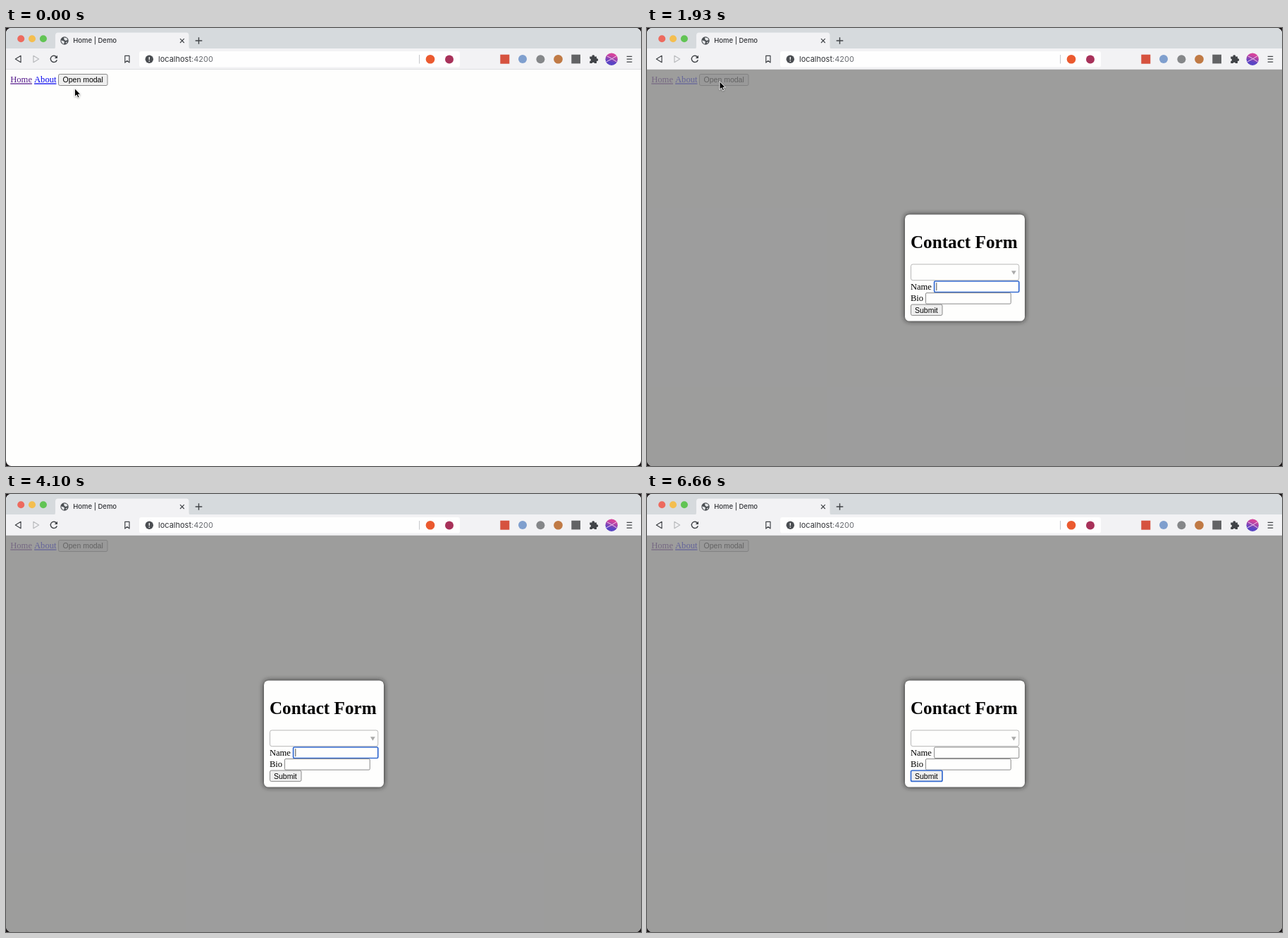
An HTML page that plays this animation: 901x621 px, repeating every 7130 ms.

```html
<!DOCTYPE html>
<html lang="en">
<head>
<meta charset="utf-8">
<title>Modal focus demo</title>
<style>
  html, body { margin: 0; width: 100%; height: 100%; overflow: hidden; background: #1b1618; }
  svg { display: block; }
  .ui { font-family: Inter, "Open Sans", sans-serif; }
  .serif { font: 12.6px "Liberation Serif", Times, serif; }
  .btn-text { font: 10.5px "Liberation Sans", Arial, sans-serif; }
  .link { text-decoration: underline; }
  .icon { fill: none; stroke: #414448; stroke-width: 1.2; }
  .field { fill: #fefefd; stroke: #777; stroke-width: .85; }
  .select { stroke: #aaa; }
  .button { fill: #efefef; stroke: #777; stroke-width: .85; }
  .button.hover { fill: #e5e5e5; }
  .button.active { fill: #f5f5f5; }
  .focus { stroke: #356bd0; stroke-width: 1.7; }
  .caret { stroke: #222; stroke-width: .8; visibility: hidden; }
  .focus + .caret { visibility: visible; }
</style>
</head>
<body>
<svg width="901" height="621" viewBox="0 0 901 621">
  <defs>
    <clipPath id="window"><rect width="901" height="621" rx="7.5"/></clipPath>
    <linearGradient id="avatar" x1=".7" y1="0" x2=".4" y2="1">
      <stop offset=".2" stop-color="#d5449c"/><stop offset=".75" stop-color="#5a45c4"/>
    </linearGradient>
    <filter id="blur" x="-20%" y="-20%" width="140%" height="140%"><feGaussianBlur stdDeviation="3.9"/></filter>
    <filter id="soft" x="-50%" y="-50%" width="200%" height="200%">
      <feDropShadow dx="0" dy=".8" stdDeviation=".8" flood-opacity=".35"/>
    </filter>
  </defs>

  <g clip-path="url(#window)">
    <rect width="901" height="621" fill="#fefefd"/>

    <!-- tab strip -->
    <rect width="901" height="30" fill="#d6dadd"/>
    <circle cx="21.2" cy="15.2" r="5" fill="#ed6a5e"/>
    <circle cx="37" cy="15.2" r="5" fill="#f4be4f"/>
    <circle cx="52.9" cy="15.2" r="5" fill="#61c454"/>
    <path d="M67 30Q70 30 70 26V10.500Q70 6.500 74 6.500H255.500Q259.500 6.500 259.500 10.500V26Q259.500 30 263 30Z" fill="#f2f2f4"/>
    <circle cx="83" cy="18" r="5.700" fill="#4b4f53"/>
    <path d="M78.300 17.500L82 18.500 83 20 82 22.800Q78.500 21.500 78.300 17.500ZM82 13.500L86 14 87.500 17 84.500 18 82.500 16.500ZM84.500 20L87 19.500 85.500 22Z" fill="#e4e6e8"/>
    <text class="ui" x="95.300" y="21.400" font-size="9.5" font-weight="500" fill="#303236">Home | Demo</text>
    <path class="icon" d="M247 15.200L252.800 21M252.800 15.200L247 21" stroke-width="1.3"/>
    <path class="icon" d="M268.700 18H278.300M273.500 13.200V22.800" style="stroke-width:1.4"/>

    <!-- toolbar -->
    <rect y="29" width="901" height="29.500" fill="#f2f2f4"/>
    <rect y="58" width="901" height="1" fill="#dddee0"/>
    <path class="icon" d="M21 39.300V48.700L13.300 44Z" stroke-linejoin="round"/>
    <path class="icon" d="M38.900 39.300V48.700L46.600 44Z" stroke-linejoin="round" style="stroke:#b9bbbe"/>
    <path class="icon" d="M71.500 41A4.600 4.600 0 1 0 72.300 45.200" style="stroke-width:1.4"/>
    <path d="M73 38.800V43H68.800Z" fill="#414448"/>
    <path class="icon" d="M168.800 39.300H175V49L171.900 46.400 168.800 49Z" stroke-linejoin="round"/>
    <rect x="189" y="33" width="455" height="22.500" rx="3" fill="#fefefe"/>
    <circle cx="203.300" cy="44.200" r="5.700" fill="#4b4e52"/>
    <path d="M203.300 41V45M203.300 46.300V47.700" stroke="#fff" stroke-width="1.3"/>
    <text class="ui" x="216" y="48.100" font-size="11" fill="#303236">localhost<tspan fill="#686b70">:4200</tspan></text>
    <path d="M586.500 38V50.500" stroke="#c6c8cb"/>
    <circle cx="602" cy="44.200" r="6.300" fill="#eb5a2f"/>
    <circle cx="629" cy="44.500" r="6" fill="#a8325a"/>
    <rect x="701.300" y="37.700" width="13" height="13" fill="#d6523f"/>
    <circle cx="733" cy="44" r="6" fill="#7f9fce"/>
    <circle cx="758.400" cy="44.200" r="6" fill="#858789"/>
    <circle cx="783.500" cy="44.200" r="6.300" fill="#c07a45"/>
    <rect x="802.300" y="37.700" width="12.700" height="12.700" fill="#626365"/>
    <path d="M828.300 40.500H831.500A1.800 1.800 0 1 1 835 40.500H838V43.300A1.800 1.800 0 1 1 838 46.800V50H834.900A1.700 1.700 0 0 0 831.600 50H828.300V46.900A1.700 1.700 0 0 0 828.300 43.500Z" fill="#414448"/>
    <circle cx="859.200" cy="44.200" r="8.700" fill="url(#avatar)"/>
    <path d="M851.500 48Q860 44 866.300 39.500M853 40Q858 42 866.500 48" fill="none" stroke="#f3c9ec" stroke-width="1"/>
    <path class="icon" d="M880.700 40.300H888.300M880.700 44.200H888.300M880.700 48.100H888.300"/>

    <!-- page -->
    <text class="serif link" x="6.200" y="77.400" fill="#551a8b">Home</text>
    <text class="serif link" x="40" y="77.400" fill="#0000ee">About</text>
    <rect id="open" class="button" x="74.500" y="65.500" width="69.500" height="16" rx="2"/>
    <text class="btn-text" x="80.600" y="77.200">Open modal</text>

    <g id="modal">
      <rect y="59" width="901" height="562" fill="rgb(128,128,128)" fill-opacity=".77"/>
      <rect x="366" y="264.500" width="170" height="151" rx="6.300" fill="#222" filter="url(#blur)"/>
      <rect x="366" y="264.500" width="170" height="151" rx="6.300" fill="#fefefd"/>
      <text class="serif" x="373.900" y="312" style="font-size:25.2px;font-weight:bold">Contact Form</text>
      <rect class="field select stop" x="374.500" y="335" width="153.300" height="22.700" rx="2.700"/>
      <path d="M517 344.300H523.800L520.400 349.700Z" fill="#aaa"/>
      <text class="serif" x="373.900" y="370.500">Name</text>
      <rect class="field stop" x="407.600" y="359" width="120.200" height="15.500" rx="1.500"/>
      <path class="caret" d="M410.800 361.200V372.200"/>
      <text class="serif" x="373.900" y="387">Bio</text>
      <rect class="field stop" x="395.500" y="375.600" width="120.800" height="15.500" rx="1.500"/>
      <path class="caret" d="M398.700 377.800V388.800"/>
      <rect class="button stop" x="374.500" y="392" width="44.500" height="15.400" rx="2"/>
      <text class="btn-text" x="380" y="403.500">Submit</text>
    </g>

    <path id="cursor" d="M0 0V11.600L2.700 9.200 4.500 13.200 6.500 12.300 4.800 8.500H8.300Z" stroke="#fff" stroke-width=".9" filter="url(#soft)"/>
  </g>
</svg>
<script>
  const LOOP = 7130, OPEN = 760;
  // Each time moves the focus one stop on, wrapping round.
  const tabs = [1930, 2330, 2830, 3360, 4100, 4500, 4960, 5430, 5830, 6260, 6660];
  const [openButton, modal, cursor] = ["open", "modal", "cursor"].map(id => document.getElementById(id));
  const stops = document.querySelectorAll(".stop");

  function draw() {
    const t = performance.now() % LOOP;

    const step = Math.max(0, Math.min(8, Math.floor((t - 30) / 42.8) + 1)) / 8;
    const ease = 1 - (1 - step) ** 2;
    const x = 97.5 + 5.5 * ease, y = 85.7 - 10 * ease;
    cursor.setAttribute("transform", `translate(${x} ${y})`);
    cursor.style.visibility = t < 2360 ? "visible" : "hidden";

    const isOpen = t >= OPEN;
    modal.style.visibility = isOpen ? "visible" : "hidden";
    modal.style.display = isOpen ? "" : "none";
    openButton.classList.toggle("hover", !isOpen && t < 530 && y < 82);
    openButton.classList.toggle("active", !isOpen && t >= 530);

    const current = tabs.filter(at => t >= at).length % stops.length;
    stops.forEach((stop, i) => stop.classList.toggle("focus", i === current));

    requestAnimationFrame(draw);
  }
  draw();
</script>
</body>
</html>
```
